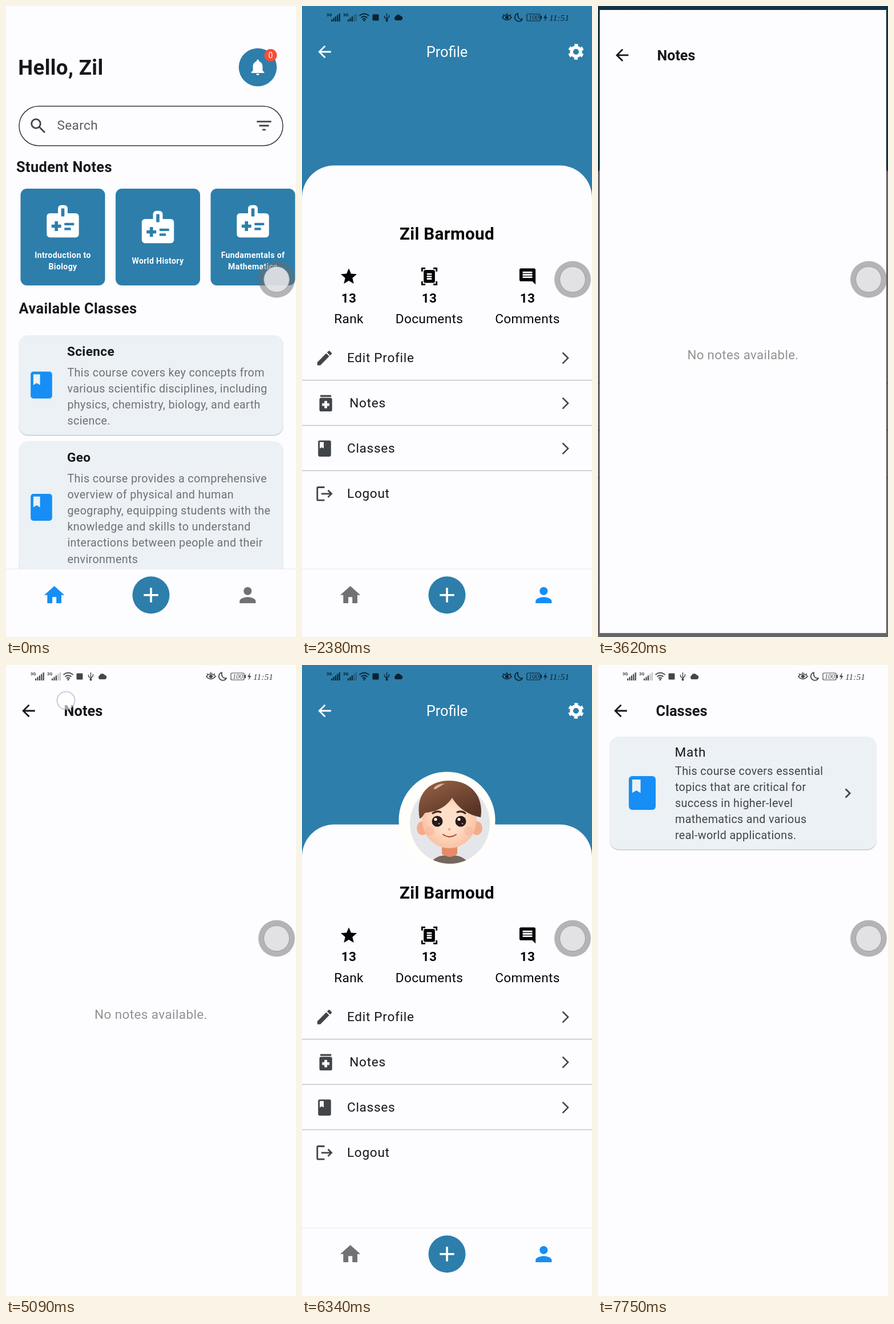
An HTML page that plays this animation: 508 px wide and 1102 px high, repeating every 8000 ms.

```html
<!DOCTYPE html>
<html lang="en">
<head>
<meta charset="utf-8">
<style>
  html, body { margin: 0; width: 100%; height: 100%; overflow: hidden; background: #fdfcff; }
  svg { display: block; width: 100vw; height: 100vh; font-family: Roboto, sans-serif; letter-spacing: .353px; }
  .b { font-weight: 700; }
  .m { text-anchor: middle; }
  .flat { letter-spacing: 0; }
  .wide { letter-spacing: .7px; }
  .line { fill: none; stroke: currentColor; }
</style>
</head>
<body>
<svg id="stage" viewBox="0 0 508 1102"></svg>
<script>
const BLUE = '#2d7eab', PAPER = '#fdfcff', ACCENT = '#168ef6', GREY = '#717175', INK = '#16171b', SLATE = '#41454a';
const DURATION = 8000;

// Icons live on a 24-unit grid.
const ICONS = {
  home: 'M10 20v-6h4v6h5v-8h3L12 3 2 12h3v8z',
  person: 'M12 12c2.2 0 4-1.8 4-4s-1.8-4-4-4-4 1.8-4 4 1.8 4 4 4zm0 2c-2.7 0-8 1.3-8 4v2h16v-2c0-2.7-5.3-4-8-4z',
  add: 'M19 13h-6v6h-2v-6H5v-2h6V5h2v6h6z',
  back: 'M20 11H7.8l5.6-5.6L12 4l-8 8 8 8 1.4-1.4L7.8 13H20z',
  filter: 'M10 18h4v-2h-4zM3 6v2h18V6zm3 7h12v-2H6z',
  bell: 'M12 22c1.1 0 2-.9 2-2h-4c0 1.1.9 2 2 2zm6-6v-5c0-3-1.6-5.6-4.5-6.3V4a1.5 1.5 0 0 0-3 0v.7C7.6 5.4 6 8 6 11v5l-2 2v1h16v-1z',
  kit: 'M20 7h-5V4a2 2 0 0 0-2-2h-2a2 2 0 0 0-2 2v3H4a2 2 0 0 0-2 2v11a2 2 0 0 0 2 2h16a2 2 0 0 0 2-2V9a2 2 0 0 0-2-2zM11 4h2v5h-2zM11 16H9v2H7v-2H5v-2h2v-2h2v2h2zM13 14.5V13h6v1.5zM13 17.5V16h4v1.5z',
  book: 'M18 2H6a2 2 0 0 0-2 2v16a2 2 0 0 0 2 2h12a2 2 0 0 0 2-2V4a2 2 0 0 0-2-2zM6 4h5v8l-2.5-1.5L6 12z',
  star: 'M12 17.3 18.2 21l-1.7-7L22 9.2l-7.2-.6L12 2 9.2 8.6 2 9.2 7.5 14 5.8 21z',
  scan: 'M7 3H4v3H2V1h5zM22 6V1h-5v2h3v3zM7 21H4v-3H2v5h5zM20 18v3h-3v2h5v-5zM19 18a2 2 0 0 1-2 2H7a2 2 0 0 1-2-2V6a2 2 0 0 1 2-2h10a2 2 0 0 1 2 2zM15 8H9v2h6zM15 11H9v2h6zM15 14H9v2h6z',
  comment: 'M22 4a2 2 0 0 0-2-2H4a2 2 0 0 0-2 2v12a2 2 0 0 0 2 2h14l4 4zM18 14H6v-2h12zM18 11H6V9h12zM18 8H6V6h12z',
  edit: 'M3 17.2V21h3.8L17.8 9.9l-3.7-3.7zM20.7 7a1 1 0 0 0 0-1.4l-2.3-2.3a1 1 0 0 0-1.4 0l-1.9 1.8 3.8 3.8z',
  jar: 'M6 3h12v2H6zM17 6H7a2 2 0 0 0-2 2v11a2 2 0 0 0 2 2h10a2 2 0 0 0 2-2V8a2 2 0 0 0-2-2zM16 15h-2.5v2.5h-3V15H8v-3h2.5V9.5h3V12H16z',
  exit: 'M17 7l-1.4 1.4 2.6 2.6H8v2h10.2l-2.6 2.6L17 17l5-5zM4 5h8V3H4a2 2 0 0 0-2 2v14a2 2 0 0 0 2 2h8v-2H4z',
  next: 'M10 6 8.6 7.4l4.6 4.6-4.6 4.6L10 18l6-6z'
};

const icon = (name, x, y, color, scale = 1.411) =>
  `<path d="${ICONS[name]}" fill="${color}" fill-rule="evenodd" transform="translate(${x} ${y}) scale(${scale}) translate(-12 -12)"/>`;
const text = (x, y, size, str, color = INK, cls = '') =>
  `<text x="${x}" y="${y}" font-size="${size}" fill="${color}" class="${cls}">${str}</text>`;
const rect = (x, y, w, h, fill, r = 0) =>
  `<rect x="${x}" y="${y}" width="${w}" height="${h}" rx="${r}" fill="${fill}"/>`;
const circle = (x, y, r, fill, more = '') => `<circle cx="${x}" cy="${y}" r="${r}" fill="${fill}" ${more}/>`;
const path = (d, fill, more = '') => `<path d="${d}" fill="${fill}" ${more}/>`;
const group = (id, body, more = '') => `<g id="${id}" ${more}>${body}</g>`;
const paragraph = (x, y, color, lines) =>
  lines.map((line, i) => text(x, y + i * 28.2, 19.75, line, color)).join('');
const card = (x, y, w, h) => rect(x, y + 1.6, w, h, '#c6cbd2', 17) + rect(x, y, w, h, '#ebf1f5', 17);
const backdrop = color => rect(0, 0, 508, 1102, color);

const navBar = (homeColor, personColor) =>
  rect(0, 983, 508, 119, PAPER) + rect(0, 982.5, 508, 1.5, '#efeff6') +
  icon('home', 84.67, 1028.8, homeColor, 1.764) + icon('person', 423.33, 1028.8, personColor, 1.764) +
  circle(254, 1028.8, 32.5, BLUE) + icon('add', 254, 1028.8, '#fff', 1.82);

function noteCard(x, lines) {
  const shift = lines.length > 1 ? 0 : 10;
  return rect(x, 319, 148, 169, BLUE, 11) + icon('kit', x + 74, 376 + shift, '#fff', 2.82) +
    lines.map((line, i) => text(x + 74, 440 + shift + i * 20, 14.1, line, '#fff', 'b m')).join('');
}

const classCard = (y, h, title, lines) =>
  card(22, y, 464, h) + icon('book', 62, y + h / 2, ACCENT, 2.35) +
  text(107, y + 36, 22.58, title, INK, 'b') + paragraph(107.4, y + 71.5, GREY, lines);

const homePage = backdrop(PAPER) +
  text(21.2, 120, 36.7, 'Hello, Zil', INK, 'b') +
  circle(441, 107, 33.3, BLUE) + icon('bell', 441, 107, '#fff') +
  circle(463.5, 86, 11, '#f94d38') + text(463.5, 91, 14, '0', '#fff', 'm') +
  `<rect x="23" y="175" width="462" height="69" rx="34.5" fill="none" stroke="#3a3a38" stroke-width="1.5"/>` +
  `<g class="line" color="${SLATE}" stroke-width="2.8"><circle cx="52.5" cy="205.5" r="7.8"/><path d="M58 211l10 10"/></g>` +
  text(89.5, 216, 22.58, 'Search', '#5d5c60') + icon('filter', 452, 209, SLATE) +
  text(18, 290, 25.4, 'Student Notes', INK, 'b') +
  noteCard(25.5, ['Introduction to', 'Biology']) +
  noteCard(192, ['World History']) +
  noteCard(358.5, ['Fundamentals of', 'Mathematics']) +
  text(22.6, 537, 25.4, 'Available Classes', INK, 'b') +
  classCard(575, 174, 'Science', ['This course covers key concepts from', 'various scientific disciplines, including',
    'physics, chemistry, biology, and earth', 'science.']) +
  classCard(760, 231, 'Geo', ['This course provides a comprehensive', 'overview of physical and human',
    'geography, equipping students with the', 'knowledge and skills to understand',
    'interactions between people and their', 'environments']) +
  navBar(ACCENT, GREY);

const eye = x => circle(x, 273, 9.5, '#2a1a17') + circle(x - 3, 269.5, 2.6, '#fff') + circle(x + 3, 277, 1.3, '#a98');
const ear = x => `<ellipse cx="${x}" cy="285" rx="10" ry="12" fill="#f4ab8b"/>`;
const avatar = circle(254, 271, 84.5, '#fffefa') + circle(259, 277, 70, '#e5e6ea') +
  `<g clip-path="url(#portrait)">` +
  path('M222 352Q230 331 258 332Q286 331 295 352Z', '#75675d') +
  path('M245 312h27v18q-13 10-27 0z', '#e58c66') + ear(211) + ear(306) + '</g>' +
  `<ellipse cx="258" cy="270" rx="47.5" ry="50" fill="url(#skin)"/>` +
  path('M206 268C198 226 222 202 258 202C296 202 319 230 313 266C291 262 274 250 263 232C254 246 238 256 216 258C212 262 210 268 206 268Z', 'url(#hair)') +
  path('M230 216Q236 207 250 207Q240 213 234 217Z', '#efcfb8', 'opacity=".8"') +
  eye(237) + eye(278) +
  `<g fill="none" stroke="#452a20" stroke-width="3" stroke-linecap="round"><path d="M229 259q7-5 14-2M272 257q8-3 14 2"/>` +
  `<path d="M247 296q11 8 23 0" stroke="#a5452f" stroke-width="2"/></g>` +
  circle(258, 287, 2.2, '#f0a584') + circle(224, 290, 8, '#f8a98e', 'opacity=".35"') + circle(292, 290, 8, '#f8a98e', 'opacity=".35"');

const stat = (x, name, label) => icon(name, x, 472.3, '#050505') +
  text(x, 517.5, 22.58, '13', '#050505', 'b m') + text(x, 554, 22.58, label, '#050505', 'm');

// Rows hold a leading icon at 22.58, then a gap of the same width, then the label.
const menuRow = (i, name, label, scale = 1.411) => {
  const y = 614.8 + i * 79, size = 24 * scale;
  return icon(name, 22.58 + size / 2, y, SLATE, scale) + text(45.16 + size, y + 7.2, 22.58, label, INK, 'wide') +
    (i < 3 ? `<path d="M456.5 ${y - 9.5}l9.5 9.5-9.5 9.5" class="line" color="${SLATE}" stroke-width="2.6"/>` +
      rect(0, y + 38, 508, 1.4, '#bdc1c7') : '');
};

const gear = `<g class="line" color="#fff" transform="translate(480 80) scale(1.411)">` +
  `<circle r="5.6" stroke-width="4"/><circle r="8.4" stroke-width="2.8" stroke-dasharray="4.4 4.396" stroke-dashoffset="-2.2"/></g>`;

const profilePage = backdrop(BLUE) +
  rect(0, 278.4, 508, 823.6, PAPER, 56.4) + rect(0, 900, 508, 202, PAPER) +
  icon('back', 39.5, 80, '#fff') + text(254, 89, 25.4, 'Profile', '#fff', 'm flat') + gear +
  group('avatar', avatar) +
  text(254, 408, 29.6, 'Zil Barmoud', '#050505', 'b m') +
  stat(82, 'star', 'Rank') + stat(223, 'scan', 'Documents') + stat(395, 'comment', 'Comments') +
  menuRow(0, 'edit', 'Edit Profile') + menuRow(1, 'jar', 'Notes', 1.588) +
  menuRow(2, 'book', 'Classes') + menuRow(3, 'exit', 'Logout') +
  navBar(GREY, ACCENT);

const titleBar = title => icon('back', 39.5, 80, INK) + text(101.6, 89, 25.4, title, INK, 'b flat');

const notesPage = backdrop(PAPER) + titleBar('Notes') +
  text(254, 618, 22.58, 'No notes available.', '#929292', 'm');

const classesPage = backdrop(PAPER) + titleBar('Classes') + card(20, 125, 468, 197) +
  icon('book', 77.5, 223.5, ACCENT, 2.94) + text(134.6, 160, 22.58, 'Math', INK, 'wide') +
  paragraph(135, 191.5, SLATE, ['This course covers essential', 'topics that are critical for',
    'success in higher-level', 'mathematics and various', 'real-world applications.']) +
  icon('next', 437.5, 224, SLATE);

const bars = (x, strong) => [0, 1, 2, 3, 4].map(i =>
  `<rect x="${x + i * 3.4}" y="${23.5 - i * 2.6}" width="2.2" height="${3.5 + i * 2.6}" fill="currentColor" opacity="${i < strong ? 1 : .35}"/>`).join('');
const C = 'currentColor';
const statusBar =
  text(43, 18, 7.5, '3G', C, 'b flat') + bars(51, 5) + text(72, 18, 7.5, '3G', C, 'b flat') + bars(80, 3) +
  `<g class="line" stroke-width="1.7"><path d="M100.5 17q8.5-7 17 0M103.5 20.5q5.5-4.5 11 0M106 23.5q3-2.5 6 0"/>` +
  `<path d="M148.5 13v13M144.5 17v3l4 3.5 4-4.5v-3" stroke-width="1.4"/>` +
  `<path d="M351 20q8-9 16 0q-8 9-16 0z"/><path d="M352 15l2 2M358.8 12.5v2M366 15l-2 2"/>` +
  `<path d="M378 13a7 7 0 1 0 8 10q-9 1-8-10z"/><rect x="394" y="14" width="23" height="12" rx="2" stroke-width="1.2"/></g>` +
  circle(109, 25.5, 1.6, C) + rect(123.5, 14.5, 11, 11, C, 1.5) + circle(148.5, 25.5, 2, C) +
  path('M164 25a4 4 0 0 1 0-7a5 5 0 0 1 9-.5a3.8 3.8 0 0 1 0 7.5z', C) +
  circle(359, 20, 3, C) + rect(418, 17, 2, 6, C) + path('M428 13l-5 8h3l-1.5 6 5-8h-3z', C) +
  `<g font-family="Liberation Serif, serif" font-style="oblique" class="flat">${text(397, 24.3, 12, '100', C)}${text(433, 25.5, 15.5, '11:51', C)}</g>`;

const stage = document.getElementById('stage');
stage.innerHTML = `<defs>
  <clipPath id="portrait"><circle cx="259" cy="277" r="70"/></clipPath>
  <linearGradient id="hair" x2=".7" y2="1"><stop stop-color="#9a6347"/><stop offset="1" stop-color="#553225"/></linearGradient>
  <radialGradient id="skin"><stop offset=".4" stop-color="#fee0ca"/><stop offset="1" stop-color="#f9c3a4"/></radialGradient>
  </defs>` +
  group('home', homePage) + group('profile', profilePage) +
  `<rect id="scrim" width="508" height="1102"/>` +
  group('notes', notesPage) + group('classes', classesPage) +
  circle(474, 477.5, 32, '#6c6c6c', 'opacity=".5"') +
  circle(474, 477.5, 22.4, '#e9e9ec', 'opacity=".88" stroke="#9a9a9a" stroke-width="1"') +
  group('status', statusBar, 'opacity=".72"') +
  `<circle id="touch" r="15.5" fill="#fff" fill-opacity=".6" stroke="#a9a7cc" stroke-opacity=".75" stroke-width="1.6"/>`;

const el = id => document.getElementById(id);
const clamp = v => Math.max(0, Math.min(1, v));
const ramp = (t, from, to) => clamp((t - from) / (to - from));

function bezier(x1, y1, x2, y2, x) {
  const at = (s, a, b) => 3 * s * (1 - s) ** 2 * a + 3 * s * s * (1 - s) * b + s ** 3;
  let low = 0, high = 1;
  for (let i = 0; i < 24; i++) {
    const mid = (low + high) / 2;
    if (at(mid, x1, x2) < x) low = mid; else high = mid;
  }
  return at(low, y1, y2);
}

// Fast start, very long settle.
const emphasized = p => p < 1 / 6
  ? .4 * bezier(.05, 0, .1333, .06, p * 6)
  : .4 + .6 * bezier(.2083, .82, .25, 1, (p - 1 / 6) * 1.2);

const SWITCH = 2200, AVATAR = 2430, OPEN_NOTES = 3483, CLOSE_NOTES = 6046, OPEN_CLASSES = 7340, ZOOM = 300;
const TOUCHES = [ // start, x, y, hold, gone
  [1920, 423, 1030, 150, 330], [3000, 225, 690, 150, 330], [5090, 105, 62, 330, 510],
  [5890, 48, 82, 150, 330], [7020, 225, 764, 150, 330]
];
const STATUS_FADES = [[400, 510, 0], [2430, 2600, 1], [3850, 3960, 0], [6500, 6620, 1], [7640, 7750, 0]];

function pose(id, opacity, scale = 1) {
  const node = el(id);
  node.style.display = opacity > 0 ? '' : 'none';
  node.setAttribute('opacity', opacity);
  node.setAttribute('transform', `translate(254 551) scale(${scale}) translate(-254 -551)`);
}

function draw(t) {
  let under = 1, scrim = 0;
  const top = { notes: [0, 1], classes: [0, 1] };
  const open = (id, start) => {
    const p = ramp(t, start, start + ZOOM), k = emphasized(p);
    top[id] = [ramp(p, .125, .25), .85 + .15 * k];
    under = 1 + .05 * k;
    scrim = .6 * ramp(p, .2075, .4175);
  };
  if (t >= OPEN_CLASSES) open('classes', OPEN_CLASSES);
  else if (t >= CLOSE_NOTES) {
    const p = ramp(t, CLOSE_NOTES, CLOSE_NOTES + ZOOM), k = emphasized(p);
    top.notes = [1 - ramp(p, .0825, .2075), 1 - .1 * k];
    under = 1.1 - .1 * k;
  } else if (t >= OPEN_NOTES) open('notes', OPEN_NOTES);

  pose('home', +(t < SWITCH));
  pose('profile', +(t >= SWITCH), under);
  pose('notes', ...top.notes);
  pose('classes', ...top.classes);
  el('scrim').setAttribute('opacity', scrim);
  el('avatar').style.display = t >= AVATAR ? '' : 'none';

  let light = 1;
  for (const [from, to, goal] of STATUS_FADES) light += (goal - light) * ramp(t, from, to);
  const v = Math.round(255 * light);
  el('status').setAttribute('color', `rgb(${v},${v},${v})`);

  const touch = TOUCHES.find(([start, , , , gone]) => t >= start && t < start + gone);
  el('touch').style.display = touch ? '' : 'none';
  if (touch) {
    const [start, x, y, hold, gone] = touch;
    el('touch').setAttribute('transform', `translate(${x} ${y})`);
    el('touch').setAttribute('opacity', 1 - ramp(t - start, hold, gone));
  }
}

const begin = performance.now();
function tick() {
  draw((performance.now() - begin) % DURATION);
  requestAnimationFrame(tick);
}
tick();
</script>
</body>
</html>
```
